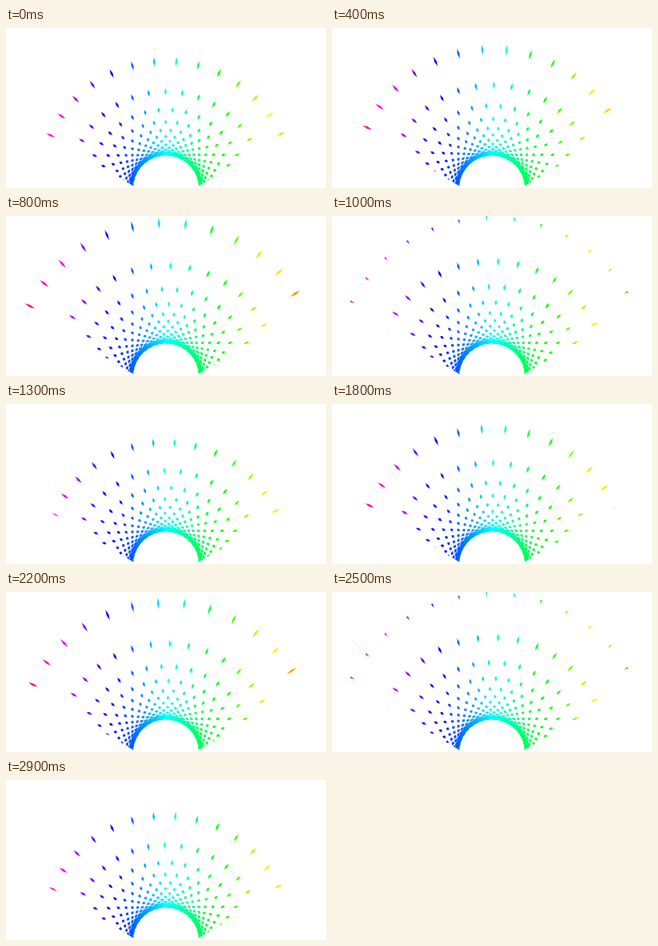
These frames come from a looping animation (400x200 px, 3000 ms). An HTML page with a canvas:

```html
<!DOCTYPE html>
<html>
<head>
<meta charset="utf-8">
<style>
  html, body { margin: 0; width: 400px; height: 200px; overflow: hidden; background: #fff; }
  canvas { display: block; }
</style>
</head>
<body>
<canvas width="400" height="200"></canvas>
<script>
const ctx = document.querySelector('canvas').getContext('2d');
const CX = 200, CY = 200.5, RADIUS = 42, REACH = 196, SPACING = 10;
const STEP = 100, PERIOD = 1500;

const rainbow = ctx.createLinearGradient(0, 0, 400, 0);
for (let i = 0; i <= 6; i++) rainbow.addColorStop(i / 6, `hsl(${360 - i * 60}, 100%, 50%)`);

// Visible region above two sloping edges
const fan = new Path2D('M200 222 L-100 42 V-10 H500 V42 Z');
ctx.lineWidth = 3;

// Half-lines leaving the circle along its tangents; turn is 1 clockwise, -1 counterclockwise
function strokeTangents(offset, turn) {
  ctx.beginPath();
  for (let deg = -180; deg < 180; deg += SPACING) {
    const a = (deg + offset) * Math.PI / 180;
    const x = CX + RADIUS * Math.sin(a), y = CY - RADIUS * Math.cos(a);
    ctx.moveTo(x, y);
    ctx.lineTo(x + turn * REACH * Math.cos(a), y + turn * REACH * Math.sin(a));
  }
  ctx.stroke();
}

function draw(now) {
  const step = Math.floor(now / STEP) % (PERIOD / STEP);
  ctx.globalCompositeOperation = 'source-over';
  ctx.clearRect(0, 0, 400, 200);
  ctx.strokeStyle = rainbow;
  strokeTangents(0, 1);
  // Keep only the crossings with the rotating set, inside the fan
  ctx.globalCompositeOperation = 'destination-in';
  ctx.strokeStyle = '#000';
  strokeTangents((step - 1) * SPACING * STEP / PERIOD, -1);
  ctx.fill(fan);
}

const start = performance.now();
function loop() {
  draw(performance.now() - start);
  requestAnimationFrame(loop);
}
loop();
</script>
</body>
</html>
```
